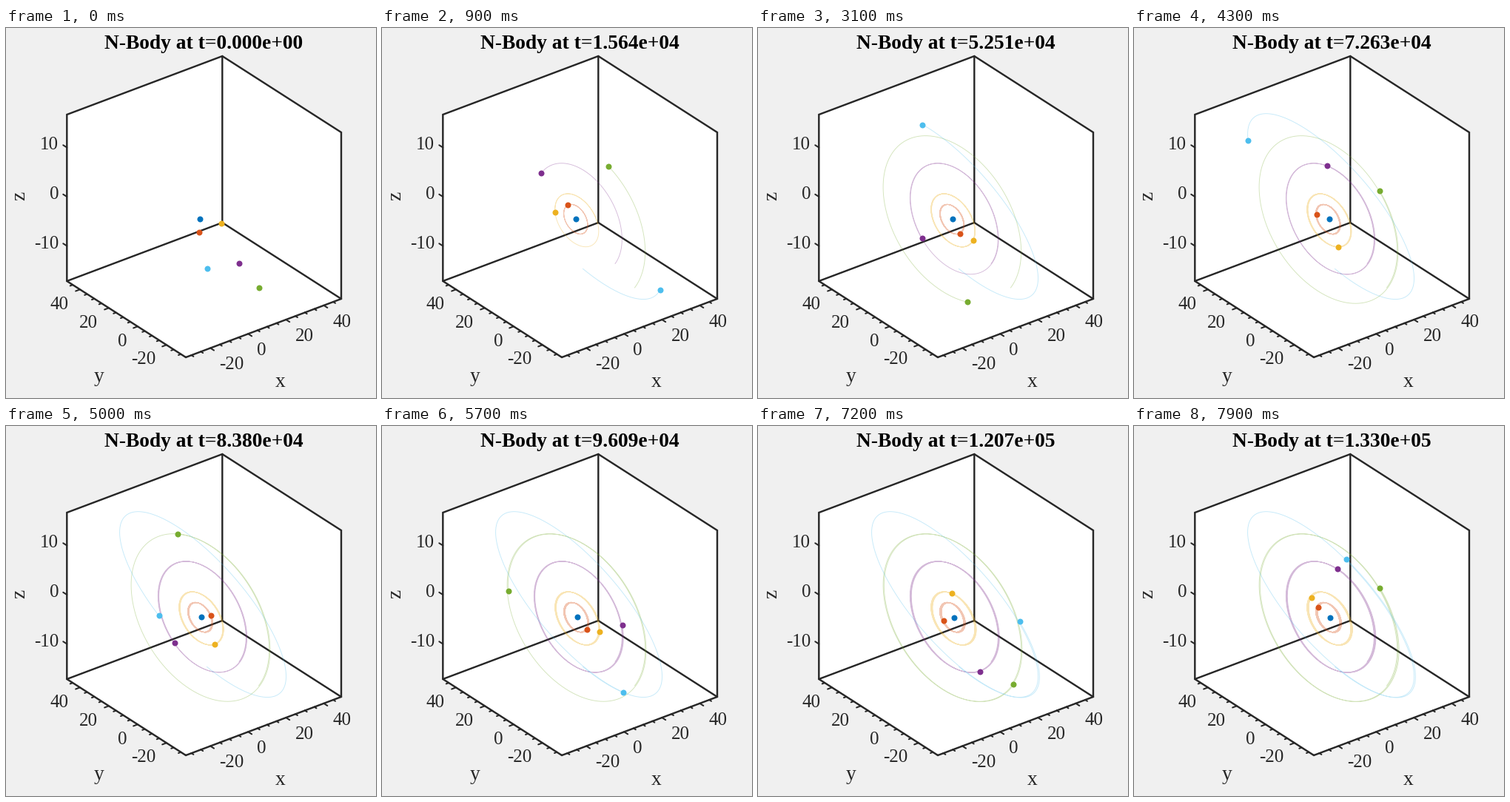
Write a matplotlib script that moves like this. It is 500 px wide and 500 px high and loops after 8000 ms.

```python
import numpy as np
import matplotlib.pyplot as plt
from matplotlib.animation import FuncAnimation

PX = 0.72  # points per pixel at 100 dpi
FRAMES, INTERVAL = 80, 100
INK, FONT = "#262626", "Liberation Serif"
STEP = 200000 / 358  # days per time sample
PER = 10             # trail points per time sample

K = 0.01720210       # Gaussian constant, radians per day
TILT = np.radians(23.44)
DRIFT = np.array([6.18e-6, -2.44e-6, -1.22e-6])  # whole system, AU per day

# Orthographic projection from AU to stage pixels
ORIGIN = np.array([262.1, 257.9])
AXES = np.array([[2.555, -0.961], [-1.951, -1.248], [0, -6.65]])
LOW = np.array([-33.0, -33.3, -17.1])


def project(p):
    return ORIGIN + p @ AXES


def sample_index(i):
    return 3 * i + i % 2


def orbit(t, a, e, lon, peri, inc, node):
    """Kepler ellipse in equatorial axes; angles in degrees at t = 0."""
    lon, peri, inc, node = np.radians([lon, peri, inc, node])
    mean = lon - peri + K * a ** -1.5 * t
    ecc = mean
    for _ in range(6):
        ecc = ecc - (ecc - e * np.sin(ecc) - mean) / (1 - e * np.cos(ecc))
    x, y = a * (np.cos(ecc) - e), a * np.sqrt(1 - e * e) * np.sin(ecc)
    r, u = np.hypot(x, y), np.arctan2(y, x) + peri - node
    along, across = r * np.cos(u), r * np.sin(u)
    flat = across * np.cos(inc)
    x = along * np.cos(node) - flat * np.sin(node)
    y = along * np.sin(node) + flat * np.cos(node)
    z = across * np.sin(inc)
    c, s = np.cos(TILT), np.sin(TILT)
    return np.stack([x, y * c - z * s, y * s + z * c], axis=1)


t = np.arange(sample_index(FRAMES - 1) * PER + 1) * STEP / PER
sun = t[:, None] * DRIFT
bodies = [
    ("#0072BD", sun),
    ("#D95319", sun + orbit(t, 5.2013, 0.0484, 232.8, 14.7, 1.30, 100.5)),
    ("#EDB120", sun + orbit(t, 9.536, 0.0539, 344.9, 92.6, 2.49, 113.7)),
    ("#7E2F8E", sun + orbit(t, 19.183, 0.0473, 290.4, 171.0, 0.77, 74.0)),
    ("#77AC30", sun + orbit(t, 30.057, 0.0086, 293.2, 45.0, 1.77, 131.8)),
    ("#4DBEEE", sun + orbit(t, 39.464, 0.2488, 231.2, 224.1, 17.14, 110.3)),
]

fig = plt.figure(figsize=(5, 5), dpi=100, facecolor="#f0f0f0")
ax = fig.add_axes([0, 0, 1, 1])
ax.set(xlim=(0, 500), ylim=(500, 0))
ax.axis("off")


def stroke(*pts, width=2.4):
    ax.plot(*zip(*pts), color=INK, lw=width * PX, zorder=2, snap=False,
            solid_capstyle="round", solid_joinstyle="miter")


def label(x, y, s, size=25, ha="center", va="baseline", color=INK, **kw):
    return ax.text(x, y, s, fontsize=size * PX, family=FONT,
                   ha=ha, va=va, color=color, **kw)


def tick(p, direction, length):
    stroke(p, p + direction / np.hypot(*direction) * length, width=2)


# Box: floor and the two back walls
front = np.array([243, 445])
ex, ey, ez = np.array([[210, -79], [-160.7, -103], [0, -225]])
left, right, back = front + ey, front + ex, front + ex + ey
outline = [front, right, right + ez, back + ez, left + ez, left]
ax.fill(*zip(*outline), color="white", lw=0, zorder=1)
stroke(*outline, front)
stroke(left, back, right)
stroke(back, back + ez)

# Ticks and their labels
for val in range(-30, 50, 5):
    length = 3.5 if val % 20 else 6
    tick(project(np.array([val, LOW[1], LOW[2]])), -AXES[1], length)
    tick(project(np.array([LOW[0], val, LOW[2]])), -AXES[0], length)
for val in range(-20, 41, 20):
    label(339.5 + 2.555 * val, 442 - 0.961 * val, str(val), ha="left")
    label(163 - 1.951 * val, 429.5 - 1.248 * val, str(val), ha="right")
for val in (-10, 0, 10):
    y = 228 - 6.65 * val
    tick(np.array([left[0], y]), AXES[1], 6)
    label(71, y + 3, str(val), ha="right")

label(370.5, 485, "x", 27.5)
label(125.5, 478.5, "y", 27.5)
label(19, 227, "z", 27.5, va="center", rotation=90)
title = label(267, 28, "", 27.5, color="black", weight="bold")

paths = [project(p) for _, p in bodies]
trails = [ax.plot([], [], color=c, lw=0.9 * PX, alpha=0.33, zorder=3)[0]
          for c, _ in bodies]
dots = [ax.plot([], [], "o", color=c, ms=8 * PX, mew=0, zorder=4,
                snap=False)[0] for c, _ in bodies]


def draw(i):
    k = sample_index(i)
    n = k * PER
    for path, trail, dot in zip(paths, trails, dots):
        trail.set_data(*path[:n + 1].T)
        dot.set_data(*path[n:n + 1].T)
    title.set_text(f"N-Body at t={k * STEP:.3e}")
    return trails + dots + [title]


anim = FuncAnimation(fig, draw, frames=FRAMES, interval=INTERVAL,
                     repeat=True, repeat_delay=0)
plt.show()
```
